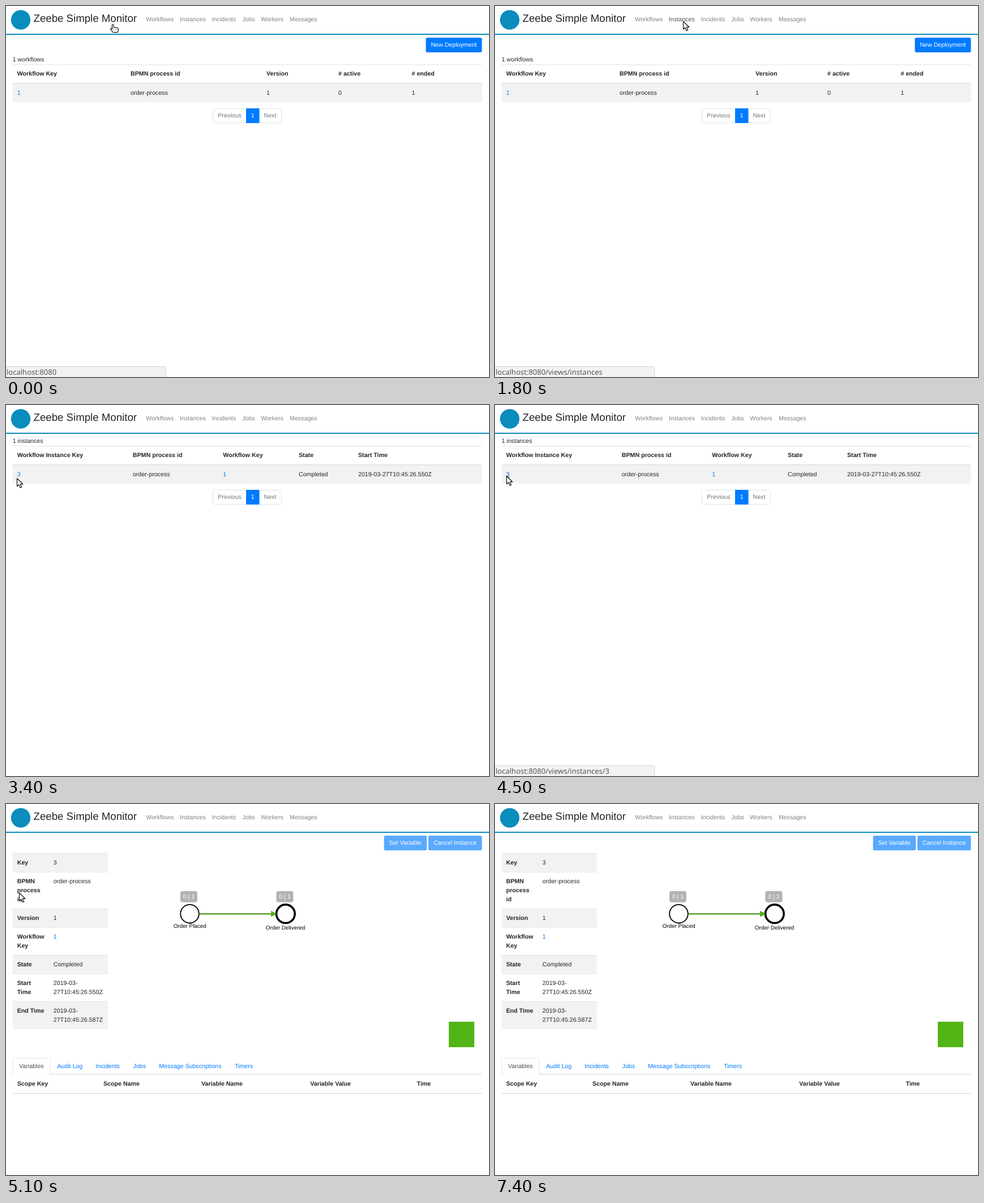
Write an HTML page that moves like this. It is 853 px wide and 656 px high and loops after 8 s.

```html
<!DOCTYPE html>
<html lang="en">
<head>
<meta charset="utf-8">
<title>Workflow monitor</title>
<style>
  html, body { margin: 0; width: 100%; height: 100%; overflow: hidden; background: #fff; }
  svg { display: block; width: 853px; height: 656px; }
  text { font: 10.667px "Liberation Sans", Arial, sans-serif; fill: #212529;
         text-rendering: geometricPrecision; white-space: pre; }
  .bold { font-weight: bold; }
  .title { font-size: 18.667px; }
  .nav { fill: #808080; }
  .nav.on { fill: #4d4d4d; }
  .link { fill: #007bff; }
  .link.on { fill: #0056b3; text-decoration: underline; }
  .white { fill: #fff; }
  .grey { fill: #6c757d; }
  .tab { fill: #495057; }
  .label { font-size: 9.85px; fill: #000; text-anchor: middle; }
  .status { font: 13px "Noto Sans", "Open Sans", sans-serif; fill: #555; }
  .cursor { fill: #fff; stroke: #111; stroke-width: 1.2; stroke-linejoin: round; }
</style>
</head>
<body>
<svg viewBox="0 0 853 656" id="stage"></svg>
<script>
const LOOP = 8000, STEP = 100;
const BLUE = '#007bff', LINE = '#dee2e6', STRIPE = '#f2f2f2', GREEN = '#52b415', TEAL = '#0a8cbc';

const text = (x, y, s, cls = '') => `<text x="${x}" y="${y}" class="${cls}">${s}</text>`;
const rect = (x, y, w, h, fill, more = '') =>
  `<rect x="${x}" y="${y}" width="${w}" height="${h}" fill="${fill}" ${more}/>`;
const path = (d, more) => `<path d="${d}" ${more}/>`;
const group = (id, body) => `<g id="${id}">${body}</g>`;
const row = (xs, y, words, cls) => words.map((w, i) => text(xs[i], y, w, cls)).join('');
const button = (x, w, s, fill) =>
  rect(x, 56, w, 26, fill, 'rx="2.7"') + text(x + 8.9, 71.7, s, 'white');

const navX = [247.3, 307.1, 363.5, 417.4, 450.3, 501];
const navNames = ['Workflows', 'Instances', 'Incidents', 'Jobs', 'Workers', 'Messages'];

function header() {
  return `<circle cx="26" cy="24.5" r="17.2" fill="${TEAL}"/>` +
    text(48.5, 28, 'Zeebe Simple Monitor', 'title') +
    row(navX, 27, navNames, 'nav') + rect(0, 49, 853, 2, TEAL);
}

function pager(y) {
  return rect(365.5, y + .5, 121, 25, '#fff', `rx="2.7" stroke="${LINE}"`) +
    rect(424, y, 23.5, 26, BLUE) +
    text(374.3, y + 15.5, 'Previous', 'grey') + text(432.8, y + 15.5, '1', 'white') +
    text(455.5, y + 15.5, 'Next', 'grey');
}

// List page whose caption baseline sits at y
function list(y, caption, xs, heads, cells, links) {
  return text(11.7, y, caption) + rect(11.7, y + 5.3, 829, 1, LINE) +
    row(xs, y + 25, heads, 'bold') +
    rect(11.7, y + 39, 829, 33, STRIPE) + rect(11.7, y + 38, 829, 1.6, LINE) +
    cells.map((c, i) => text(xs[i], y + 59, c, links.includes(i) ? 'link' : '')).join('') +
    pager(y + 83);
}

const workflows = button(741.5, 99, 'New Deployment', BLUE) +
  list(98, '1 workflows', [19.7, 220, 460, 587, 716.5],
    ['Workflow Key', 'BPMN process id', 'Version', '# active', '# ended'],
    ['1', 'order-process', '1', '0', '1'], [0]);

const instances = list(67, '1 instances', [19.7, 223.8, 383.3, 517, 622],
  ['Workflow Instance Key', 'BPMN process id', 'Workflow Key', 'State', 'Start Time'],
  ['3', 'order-process', '1', 'Completed', '2019-03-27T10:45:26.550Z'], [0, 2]);

function facts() {
  const rows = [
    ['Key', '3'], ['BPMN|process|id', 'order-process'], ['Version', '1'],
    ['Workflow|Key', '1'], ['State', 'Completed'],
    ['Start|Time', '2019-03-|27T10:45:26.550Z'], ['End Time', '2019-03-|27T10:45:26.587Z']];
  let y = 87;
  return rows.map(([name, value], i) => {
    const names = name.split('|'), values = value.split('|');
    const h = 17 + 16 * Math.max(names.length, values.length);
    const lines = (x, list, cls) => list.map((s, j) => text(x, y + 20 + 16 * j, s, cls)).join('');
    const out = (i % 2 ? '' : rect(11.7, y, 168.3, h, STRIPE)) + rect(11.7, y, 168.3, .8, LINE) +
      lines(19.7, names, 'bold') + lines(83.8, values, i === 3 ? 'link' : '');
    y += h;
    return out;
  }).join('');
}

const badge = x => rect(x, 154, 30, 19.7, '#b3b3b3', 'rx="4"') + text(x + 4.7, 167, '0 | 1', 'white');
const event = (x, width) =>
  `<circle cx="${x}" cy="194.2" r="16.3" fill="#fff" stroke="#000" stroke-width="${width}"/>`;
const flow = color => path('M341 194.3H470', `stroke="${color}" stroke-width="1.8"`) +
  path('M468 189.3L478 194.3L468 199.3Z', `fill="${color}"`);

const detail = button(667.6, 75.5, 'Set Variable', '#59a9ff') +
  button(746, 94.5, 'Cancel Instance', '#59a9ff') + facts() +
  flow('#000') + event(324.5, 1.8) + event(493.8, 3.6) +
  text(324.7, 219.3, 'Order Placed', 'label') + text(493.6, 222, 'Order Delivered', 'label') +
  group('progress', flow(GREEN) + badge(308) + badge(477.4)) +
  rect(782, 385, 45, 45, GREEN) +
  rect(11.7, 477, 829, 1.4, LINE) +
  path('M12 478.5V452Q12 449.5 14.7 449.5H75.5Q78.2 449.5 78.2 452V478.5',
    `fill="#fff" stroke="${LINE}"`) +
  text(23, 466.5, 'Variables', 'tab') +
  row([90.2, 158.3, 224.6, 270.2, 404], 466.5,
    ['Audit Log', 'Incidents', 'Jobs', 'Message Subscriptions', 'Timers'], 'link') +
  row([19.7, 172, 345, 537.3, 725.6], 497.7,
    ['Scope Key', 'Scope Name', 'Variable Name', 'Variable Value', 'Time'], 'bold') +
  rect(11.7, 511, 829, 1.5, LINE);

const status = path('M-1 657V637.5H279Q282 637.5 282 640.5V657', `fill="${STRIPE}" stroke="#d4d4d4"`) +
  text(1, 652, '', 'status');

const arrow = path('M.5 .8V14.8L3.8 11.8L6.2 17.3L8.7 16.2L6.3 10.8H10.8Z', 'id="arrow" class="cursor"');
const hand = group('hand',
  path('M-1.6 9V2Q-1.6 .6 -.3 .6T1 2V5.6L7.5 6.6Q9.3 7 9.3 8.6V11L8 14.6H.2L-4.3 9.6Q-4.6 7.6 -2.8 7.8Z',
    'class="cursor"') +
  path('M1.2 9.5V10.6M3.7 9.5V10.6M6.2 9.5V10.6', 'stroke="#111" stroke-width=".8"'));

const stage = document.getElementById('stage');
stage.innerHTML = header() + group('page0', workflows) + group('page1', instances) +
  group('page2', detail) + group('status', status) + group('cursor', arrow + hand);

const $ = s => stage.querySelector(s);
const show = (s, on) => { $(s).style.display = on ? '' : 'none'; };
const navItems = stage.querySelectorAll('.nav');
const rowLink = $('#page1 .link');

// Pointer moves: start time, number of steps, destination
const moves = [
  [600, 7, 335, 32], [1300, 2, 332, 26.5], [2800, 2, 75, 155], [3000, 1, 45, 165],
  [3200, 3, 19, 129], [3600, 2, 20, 125], [5000, 2, 23, 156.5], [5300, 2, 35, 357],
  [5600, 1, 107, 497], [5800, 1, 182, 539], [6100, 1, 290.5, 583], [6300, 1, 291, 582.5],
  [7300, 1, 308, 589]];

function pointer(t) {
  let x = 189, y = 32;
  for (const [start, steps, toX, toY] of moves) {
    if (t < start) break;
    const k = Math.min(1, (Math.floor((t - start) / STEP) + 1) / steps);
    x += (toX - x) * k;
    y += (toY - y) * k;
  }
  return [x, y];
}

function address(t) {
  if (t < 600) return 'localhost:8080';
  if (t >= 1500 && t < 2200) return 'localhost:8080/views/instances';
  if (t >= 3900 && t < 5000) return 'localhost:8080/views/instances/3';
  return '';
}

function draw(t) {
  const page = t < 2000 ? 0 : t < 4800 ? 1 : 2;
  for (let i = 0; i < 3; i++) show('#page' + i, i === page);
  show('#progress', t >= 5000);

  const [x, y] = pointer(t);
  const loading = t >= 2000 && t < 2400;
  const over = y < 40 && !loading ? navX.findLastIndex(left => x >= left - 5.3) : -1;
  navItems.forEach((item, i) => item.classList.toggle('on', i === over));
  const onRow = t >= 3600 && t < 4800;
  rowLink.classList.toggle('on', onRow);

  const pressed = (t >= 1800 && t < 2400) || t >= 4500;
  const pointing = !pressed && (over >= 0 || onRow || (y < 45 && x < 236));
  show('#hand', pointing);
  show('#arrow', !pointing);
  show('#cursor', t < 7400);
  $('#cursor').setAttribute('transform', `translate(${x} ${y})`);

  const url = address(t);
  show('#status', url);
  $('.status').textContent = url;
}

function tick() {
  draw(performance.now() % LOOP);
  requestAnimationFrame(tick);
}
tick();
</script>
</body>
</html>
```
